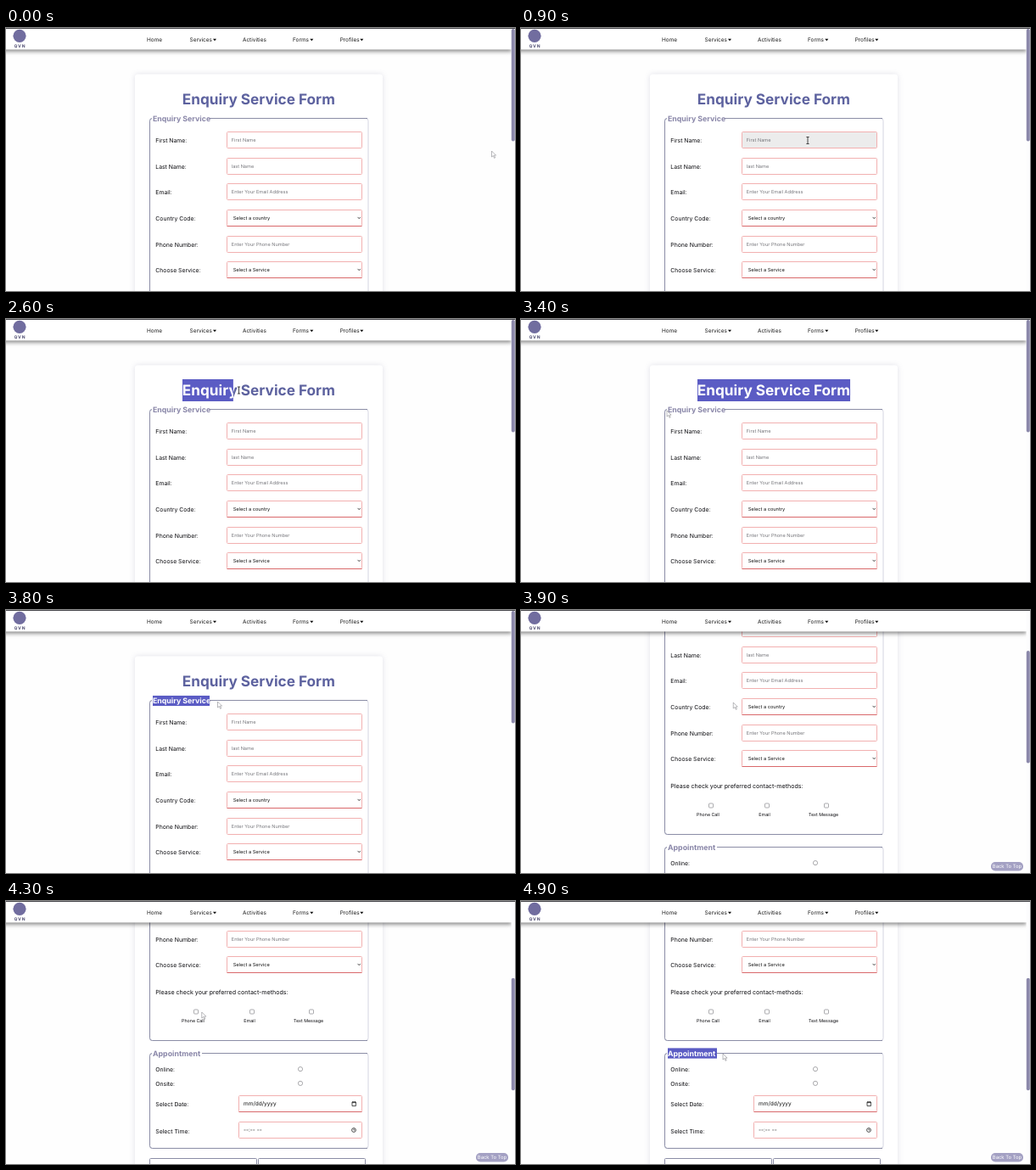
Animation of 600x310 px, one loop 5 s. Source, as an HTML page:

```html
<!DOCTYPE html>
<html lang="en">
<head>
<meta charset="utf-8">
<title>Enquiry form</title>
<style>
  html, body { margin: 0; width: 100%; height: 100%; overflow: hidden; background: #fefefe; }
  svg { display: block; }
  text { font-family: Inter, sans-serif; text-rendering: geometricPrecision; white-space: pre; }
  .label { font-size: 6.85px; fill: #08080c; }
  .note { font-size: 7.08px; fill: #08080c; }
  .hint { font-size: 5.6px; fill: #77777c; }
  .value { font-size: 5.65px; fill: #111; }
  .date { font-size: 6.5px; fill: #111; }
  .small { font-size: 5.3px; fill: #08080c; text-anchor: middle; }
  .nav { font-size: 6.45px; fill: #1a1a1a; }
  .title { font-size: 17.2px; font-weight: 700; fill: #5d629f; }
  .legend { font-size: 8.8px; font-weight: 700; fill: #8986a8; }
  .sel rect { fill: #5b5cc4; }
  .sel text { fill: #fff; }
  .frame { fill: none; stroke: #d3d4e0; }
  .rim { fill: none; stroke: #8b8da6; }
  .field { fill: #fff; stroke: #f2b0b0; }
  .edge { stroke: #d9696b; }
  .box { fill: #fff; stroke: #88888d; stroke-width: .7; }
  .icon { fill: none; stroke: #222; stroke-width: .8; }
  #card { filter: drop-shadow(0 0 3px rgba(70, 70, 120, .16)); }
  #bar { filter: drop-shadow(0 2px 2.5px rgba(0, 0, 0, .5)); }
</style>
</head>
<body>
<svg id="stage" width="600" height="310" viewBox="0 0 600 310"></svg>
<script>
const LOOP = 5000, STEP = 100;

const text = (cls, x, y, s) => `<text class="${cls}" x="${x}" y="${y}">${s}</text>`;
const rect = (cls, x, y, w, h, r = 0) =>
  `<rect class="${cls}" x="${x}" y="${y}" width="${w}" height="${h}" rx="${r}"/>`;
const path = (cls, d) => `<path class="${cls}" d="${d}"/>`;

// Text with a highlighted copy whose visible width grows with the selection.
const selectable = (id, cls, x, y, s, top, h) => text(cls, x, y, s) +
  `<svg class="sel" id="${id}" x="${x}" y="${top}" width="0" height="${h}">
    <rect width="100%" height="100%"/>${text(cls, 0, y - top, s)}</svg>`;

const field = (x, y, strong) => rect('field', x, y, 419.5 - x, 19, 1) +
  (strong ? path('edge', `M${x} ${y + 19}H419.5`) : '');

// Left, top and bottom are darker than the right side.
const fieldset = (y, h, gap) => rect('frame', 169.5, y, 257.5, h, 3) +
  path('rim', `M426 ${y}H172.5q-3 0-3 3v${h - 6}q0 3 3 3H426`) +
  `<rect x="172" y="${y - 1}" width="${gap}" height="2" fill="#fff"/>`;

const rows = [
  ['First Name:', 'First Name'],
  ['Last Name:', 'last Name'],
  ['Email:', 'Enter Your Email Address'],
  ['Country Code:', 'Select a country', true],
  ['Phone Number:', 'Enter Your Phone Number'],
  ['Choose Service:', 'Select a Service', true],
].map(([name, hint, list], i) => {
  const y = Math.round(122.1 + i * 30.6) + .5;
  return text('label', 176.3, y + 12.7, name) + field(260.5, y, list) +
    (list ? text('value', 267.7, y + 11.5, hint) + path('icon', `M414.6 ${y + 8.4}l1.6 1.8 1.6-1.8`)
          : text('hint', 265.8, y + 11.5, hint));
}).join('');

const checks = [[224, 220.5, 'Phone Call'], [290, 287, 'Email'], [360, 356.5, 'Text Message']]
  .map(([x, mid, s]) => rect('box', x - 2.5, 338, 5, 5, 1) + text('small', mid, 352.8, s)).join('');

const radios = [['Online:', 408.4], ['Onsite:', 425.2]].map(([s, y]) =>
  text('label', 176.3, y + 2.6, s) + `<circle class="box" cx="347" cy="${y - .3}" r="2.6"/>`).join('');

const page = '<rect id="card" x="152" y="54.5" width="292" height="700" rx="3" fill="#fff"/>' +
  selectable('title', 'title', 207.8, 89.8, 'Enquiry Service Form', 71, 26) +
  fieldset(106.5, 268, 68) +
  selectable('enquiry', 'legend', 173, 109.8, 'Enquiry Service', 100.8, 12.4) +
  rows + text('note', 176.3, 320.4, 'Please check your preferred contact-methods:') + checks +
  fieldset(389.5, 112, 59) +
  selectable('appointment', 'legend', 173, 393, 'Appointment', 383.2, 12.6) + radios +
  text('label', 176.3, 452.2, 'Select Date:') + field(274.5, 439.5, true) +
  text('date', 280, 451.2, 'mm/dd/yyyy') + path('icon', 'M408 447h4.4v4.6h-4.4zM408 447.6h4.4M409 446v1M411.4 446v1') +
  text('label', 176.3, 483.6, 'Select Time:') + field(274.5, 470.5) +
  text('date', 280, 482.4, '--:-- --') +
  '<circle class="icon" cx="410" cy="480" r="2.4"/>' + path('icon', 'M410 478.6V480h1.2') +
  rect('rim', 169.5, 513.5, 126, 20, 1) + rect('rim', 297.5, 513.5, 126, 20, 1);

const menu = [[166, 'Home'], [216.5, 'Services', 246], [279, 'Activities'], [338, 'Forms', 360.3], [393.7, 'Profiles', 419.3]]
  .map(([x, s, caret]) => text('nav', x, 16.2, s) +
    (caret ? path('', `M${caret - 2} 12.8h4l-2 2.4z`) : '')).join('');

const stage = document.getElementById('stage');
stage.innerHTML = `
  <g id="page">${page}</g>
  <rect id="bar" x="-10" y="-10" width="606" height="35.4" fill="#fff"/>
  <rect width="600" height="1" fill="#4a4a4e"/>
  <circle cx="16" cy="9.3" r="7.6" fill="#716d9f"/>
  <text x="16.4" y="23" font-size="5" font-weight="700" letter-spacing=".9" text-anchor="middle" fill="#4d4b70">QVN</text>
  ${menu}
  <g id="top"><rect x="554" y="297" width="38" height="10.4" rx="5" fill="#a3a0c3"/>
    <text x="573" y="304.3" font-size="5.9" text-anchor="middle" fill="#fff">Back To Top</text></g>
  <rect x="595.6" y="1" width="4.4" height="309" fill="#fcfcfd"/>
  <rect id="thumb" x="595.8" y="1" width="4" height="132.5" rx="2" fill="#8b88aa"/>
  <path id="arrow" d="M0 0V7L1.8 5.5 3.1 8.4 4.2 7.8 2.9 5.1H5.1Z" fill="#fff" stroke="#88888d" stroke-width=".6"/>
  <path id="beam" d="M-1.6-4H1.6M0-4V4M-1.6 4H1.6" fill="none" stroke="#333" stroke-width=".9"/>`;

const $ = id => document.getElementById(id);
const firstField = stage.querySelector('.field');

// time, x, y
const pointer = [
  [0, 572.5, 145], [200, 572.5, 145], [500, 500, 142], [800, 366, 133], [900, 338, 132.5],
  [1100, 338, 132.5], [1600, 329, 126], [1700, 329, 126], [2000, 191, 77], [2200, 166, 78],
  [2300, 166, 78], [2500, 209, 84], [2700, 340, 84], [2800, 406, 86], [2900, 380, 100],
  [3200, 190, 112], [3400, 172, 108], [3500, 173, 107], [3800, 249.5, 108], [4000, 251, 110],
  [4200, 250, 115], [4600, 173, 179], [4900, 238, 180],
];
const scrolling = [[3800, 0], [3900, 110], [4000, 193], [4100, 209], [4200, 210]];

function at(keys, t) {
  const i = keys.findIndex(k => k[0] >= t);
  if (i < 1) return keys.at(i).slice(1);
  const a = keys[i - 1], b = keys[i], p = (t - a[0]) / (b[0] - a[0]);
  return a.slice(1).map((v, n) => v + (b[n + 1] - v) * p);
}

// id, drag start, drag end, cleared, full width
const selections = [
  ['title', 2500, 2800, 3500, 180.4],
  ['enquiry', 3500, 3800, 4300, 67],
  ['appointment', 4600, 4900, LOOP, 58],
];
// left, top, right, bottom on the page
const fieldZone = [261, 122, 420, 142];
const textZones = [fieldZone, [208, 74, 388, 94], [173, 101, 240, 113], [173, 384, 231, 396]];

function draw(now) {
  const t = Math.floor(now % LOOP / STEP) * STEP;
  const [x, y] = at(pointer, t), [scroll] = at(scrolling, t);
  const over = ([l, u, r, d]) => x >= l && x <= r && y + scroll >= u && y + scroll <= d;
  const show = (id, on) => $(id).setAttribute('visibility', on ? 'visible' : 'hidden');

  $('page').setAttribute('transform', `translate(0 ${-scroll})`);
  $('thumb').setAttribute('y', 1 + scroll * .427);
  show('top', scroll > 50);
  firstField.style.fill = over(fieldZone) ? '#ececec' : '';

  for (const [id, from, to, end, width] of selections) {
    const p = t < end ? Math.min(1, Math.max(0, (t - from) / (to - from))) : 0;
    $(id).setAttribute('width', width * p);
  }

  const beam = textZones.some(over);
  show('beam', beam);
  show('arrow', !beam);
  for (const id of ['beam', 'arrow']) $(id).setAttribute('transform', `translate(${x} ${y})`);
  requestAnimationFrame(() => draw(performance.now()));
}
draw(performance.now());
</script>
</body>
</html>
```
